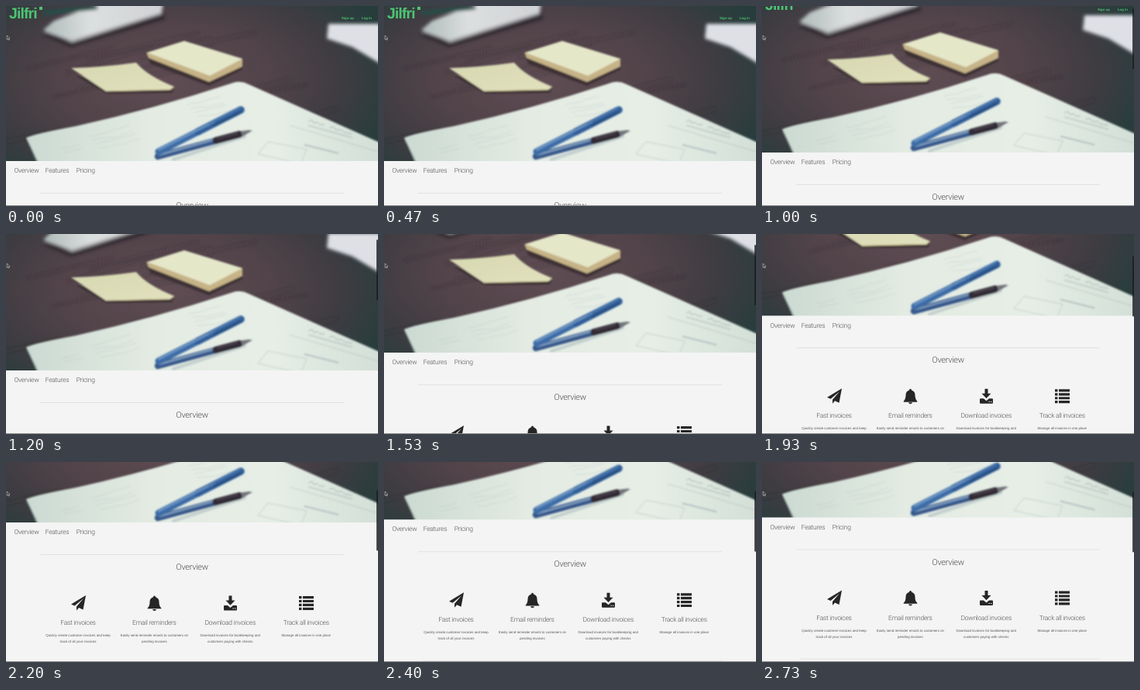
Recreate the animation shown at these times as an HTML page. Size 480x258 px, loop 3070 ms.

```html
<!DOCTYPE html>
<html lang="en">
<head>
<meta charset="utf-8">
<title>Landing page scroll</title>
<style>
  html, body { margin: 0; width: 100%; height: 100%; overflow: hidden; background: #f4f4f4; }
  svg { display: block; width: 480px; height: 258px; }
  text { text-rendering: geometricPrecision; }
  .light { font-family: Roboto, "Liberation Sans", sans-serif; font-weight: 300; letter-spacing: -.03em; fill: #505050; }
  .nav, .col { font-size: 8.5px; }
  .head { font-size: 11px; }
  .mid { text-anchor: middle; }
  .note { font: 4.4px "Liberation Sans", Arial, sans-serif; fill: #555; text-anchor: middle; }
  .green { font-family: "Liberation Sans", Arial, sans-serif; font-weight: bold; fill: #4cc573; }
  .logo { font-size: 19.5px; letter-spacing: -.9px; }
  .link { font-size: 4.3px; }
</style>
</head>
<body>
<svg viewBox="0 0 480 258" xmlns="http://www.w3.org/2000/svg">
  <defs>
    <radialGradient id="desk" gradientUnits="userSpaceOnUse" cx="0" cy="0" r="1" gradientTransform="translate(205 95) scale(310 165)">
      <stop offset="0" stop-color="#604d54"/>
      <stop offset=".45" stop-color="#514349"/>
      <stop offset=".75" stop-color="#3d3c41"/>
      <stop offset="1" stop-color="#263d3c"/>
    </radialGradient>
    <linearGradient id="sheet" x1="0" y1="0" x2="1" y2="0">
      <stop offset="0" stop-color="#cbdad2"/>
      <stop offset=".35" stop-color="#e3ebe3"/>
      <stop offset=".7" stop-color="#e6eee6"/>
      <stop offset="1" stop-color="#d2dfd7"/>
    </linearGradient>
    <linearGradient id="yellow" x1="0" y1="0" x2="1" y2="1">
      <stop offset="0" stop-color="#d6d8b2"/>
      <stop offset="1" stop-color="#e2e1bd"/>
    </linearGradient>
    <linearGradient id="stack" x1="0" y1="0" x2="1" y2="0">
      <stop offset="0" stop-color="#aebbb9"/>
      <stop offset=".4" stop-color="#dcdfdf"/>
      <stop offset="1" stop-color="#d0d2d5"/>
    </linearGradient>
    <filter id="soft" x="-10%" y="-10%" width="120%" height="120%"><feGaussianBlur stdDeviation="2"/></filter>
    <filter id="mild" x="-10%" y="-10%" width="120%" height="120%"><feGaussianBlur stdDeviation="1.3"/></filter>
    <filter id="near" x="-10%" y="-10%" width="120%" height="120%"><feGaussianBlur stdDeviation=".8"/></filter>
  </defs>

  <g id="page">
    <rect width="480" height="201" fill="url(#desk)"/>
    <g id="grain" fill="none" stroke="#2f252b" stroke-opacity=".16" filter="url(#soft)"/>

    <!-- far papers -->
    <g filter="url(#soft)">
      <path d="M46 37L84 53L205 17L202 4Z" fill="#2e282d"/>
      <path d="M48 31L62 19L122 -4H203L200 11L85 47Z" fill="url(#stack)"/>
      <path d="M50 33L85 45L199 10" fill="none" stroke="#8d878c" stroke-width="1.5"/>
      <path d="M48 9L118 2" stroke="#24504a" stroke-width="5"/>
      <path d="M416 23L484 23V75L447 53L414 42Z" fill="#dee0e6"/>
    </g>

    <!-- sticky notes -->
    <g filter="url(#mild)">
      <path d="M90 90L130 113L214 112L217 106Z" fill="#3d3035"/>
      <path d="M84 80Q125 79 168 73Q182 90 217 104L212 108L129 110Q108 96 84 80Z" fill="url(#yellow)"/>
      <path d="M129 110L212 108L217 104" fill="none" stroke="#b5ac82" stroke-width="1.2"/>
      <path d="M182 66L187 75L262 103L305 82V72Z" fill="#3d3034"/>
      <path d="M181 60L184 67L262 98L305 78V68Z" fill="#c6b387"/>
      <path d="M182 60L230 45L305 68L263 90Z" fill="#e5e7c9"/>
    </g>

    <!-- sheet -->
    <g filter="url(#near)">
      <path d="M26 170Q36 165 90 155Q190 133 290 100Q302 95 313 101L484 177V204H41Z" fill="url(#sheet)"/>
      <path d="M27 172L42 203" stroke="#93a29d" stroke-width="1.5"/>
      <g id="sketch" fill="none" stroke="#8d9d9d" stroke-width=".7" stroke-opacity=".28"/>
      <g fill="none" stroke="#9eacab" stroke-width=".7" stroke-opacity=".65">
        <path d="M338 175L388 185L380 204M338 175L325 191L374 202M366 154L480 188"/>
        <path d="M390 149l5 -2l2 4l5 -1l3 3l6 0M417 157l6 -1l3 4l7 0l3 3l11 2M390 154L447 170" stroke="#6d7980"/>
        <path d="M385 179L429 190" stroke="#798b9c" stroke-width="2" stroke-dasharray="1.5 .8"/>
      </g>
    </g>

    <!-- pens -->
    <g stroke-linecap="round" fill="none" filter="url(#near)">
      <path d="M216 198L308 168" stroke="#a3b4b8" stroke-width="4" stroke-opacity=".5"/>
      <path d="M196 194L270 174" stroke="#37598a" stroke-width="8.500"/>
      <path d="M198 192L268 172.500" stroke="#86a5c7" stroke-width="2"/>
      <path d="M197 188L250 161" stroke="#3c6ca6" stroke-width="9"/>
      <path d="M248 162L303 134" stroke="#335f99" stroke-width="9.500"/>
      <path d="M197 185.500L268 149.500" stroke="#6f9ac8" stroke-width="2"/>
      <path d="M262 152L302 131.500" stroke="#4f7fb6" stroke-width="1.800"/>
      <path d="M268 154L303 136.500" stroke="#25466f" stroke-width="1.500"/>
      <path d="M271 173.500L301 165.500" stroke="#302b34" stroke-width="9"/>
      <path d="M273 171L299 164" stroke="#5a505c" stroke-width="1.200"/>
      <path d="M303 161.500L314 160L318 161L314 163L305 168.500Z" fill="#73737a"/>
    </g>

    <text class="green logo" x="4" y="15.500">Jilfri</text>
    <rect x="43" y="1" width="4" height="4" fill="#4cc573"/>
    <text class="green link" x="433" y="16.800">Sign up</text>
    <text class="green link" x="459" y="16.800">Log in</text>

    <rect y="200" width="480" height="260" fill="#f4f4f4"/>
    <text class="light nav" x="10.500" y="215.200">Overview</text>
    <text class="light nav" x="50.700" y="215.200">Features</text>
    <text class="light nav" x="90.700" y="215.200">Pricing</text>
    <path d="M44 241.500H436M50 382.500H436" stroke="#dedede" stroke-width=".8"/>
    <text class="light head mid" x="240" y="261">Overview</text>

    <g fill="#262626">
      <path d="M103 294L99.500 312.500L94 310L91 313.500V308.500L100 298L88.500 307.500L84 305.500Z"/>
      <path d="M191.500 294.500q1.500 0 1.500 1.700q4.500 1.300 4.500 6.300q0 5.500 2.800 7.800v1h-17.600v-1q2.800-2.300 2.800-7.800q0-5 4.500-6.300q0-1.700 1.500-1.700zM189 312h5q-.5 2-2.500 2t-2.500-2z"/>
      <path d="M287.500 294.500h4v6h4l-6 6.200l-6-6.200h4zM282 307h4l3.500 3l3.500-3h4q1 0 1 1v4.500q0 1-1 1h-15q-1 0-1-1v-4.500q0-1 1-1z"/>
      <path d="M292.500 311h1.500M295 311h1.500" stroke="#f4f4f4" stroke-width="1"/>
      <path id="list"/>
    </g>
    <g id="columns"/>
  </g>

  <rect id="thumb" x="478" width="2" height="78" rx="1" fill="#1c1c1e" fill-opacity=".8"/>
  <path d="M1.300 38V43.300L2.500 42.200L3.300 44L4.200 43.600L3.400 41.900H5Z" fill="#222" stroke="#ddd" stroke-width=".6"/>
  <rect y="257" width="480" height="1" fill="#8b8b8b"/>
</svg>
<script>
const $ = id => document.getElementById(id);
const LOOP = 3070, FPS = 15;

const columns = [
  [93, 'Fast invoices', 'Quickly create customer invoices and keep', 'track of all your invoices'],
  [191.4, 'Email reminders', 'Easily send reminder emails to customers on', 'pending invoices'],
  [289.2, 'Download invoices', 'Download invoices for bookkeeping and', 'customers paying with checks'],
  [387.3, 'Track all invoices', 'Manage all invoices in one place', '']
];
$('columns').innerHTML = columns.map(([x, title, a, b]) =>
  `<text class="light col mid" x="${x}" y="332">${title}</text>
   <text class="note" x="${x}" y="347">${a}</text>
   <text class="note" x="${x}" y="355">${b}</text>`).join('');

$('list').setAttribute('d', [0, 1, 2, 3].map(i => {
  const y = 295 + i * 4.9;
  return `M378 ${y}h3.500v3.200h-3.500zM383 ${y}h14v3.200h-14z`;
}).join(''));

let seed = 7;
const rand = () => (seed = seed * 16807 % 2147483647) / 2147483647;

$('grain').innerHTML = Array.from({ length: 16 }, () => {
  const x = rand() * 400 - 40, y = rand() * 200;
  return `<path d="M${x} ${y}l${90 + rand() * 80} ${-22 - rand() * 14}" stroke-width="${2 + rand() * 4}"/>`;
}).join('');

// Faint handwriting rows, following the tilt of the sheet
function scribble(x, y, rows, w) {
  let d = '';
  for (let r = 0; r < rows; r++) {
    d += `M${x + r * 4} ${y + r * 5}`;
    for (let i = 0; i < w; i += 4) d += `l4 ${-1 + (rand() - .5) * 2}`;
  }
  return `<path d="${d}"/>`;
}
$('sketch').innerHTML = scribble(108, 168, 4, 52) + scribble(234, 128, 4, 44) + scribble(70, 184, 2, 24);

// Scroll offset by frame, joined by a monotone cubic
const keys = [[12, 0], [15, 11], [18, 24], [23, 47], [26, 67], [33, 122], [41, 128.5]];
const slope = i => (keys[i + 1][1] - keys[i][1]) / (keys[i + 1][0] - keys[i][0]);
const tangent = i => {
  if (i === 0 || i === keys.length - 1) return 0;
  const a = slope(i - 1), b = slope(i);
  return 2 * a * b / (a + b);
};
function scrollAt(f) {
  if (f <= keys[0][0]) return 0;
  const i = keys.findIndex((k, n) => n < keys.length - 1 && f < keys[n + 1][0]);
  if (i < 0) return keys[keys.length - 1][1];
  const [x0, y0] = keys[i], [x1, y1] = keys[i + 1];
  const h = x1 - x0, u = (f - x0) / h, v = 1 - u;
  return y0 * (1 + 2 * u) * v * v + y1 * u * u * (3 - 2 * u)
    + h * u * v * (tangent(i) * v - tangent(i + 1) * u);
}

function draw(ms) {
  const frame = Math.floor(ms * FPS / 1000 + .1);
  const s = scrollAt(frame);
  $('page').setAttribute('transform', `translate(0 ${-s.toFixed(2)})`);
  $('thumb').setAttribute('y', (s * .3).toFixed(2));
  $('thumb').setAttribute('visibility', s > 0 ? 'visible' : 'hidden');
}

const start = performance.now();
function tick() {
  draw((performance.now() - start) % LOOP);
  requestAnimationFrame(tick);
}
draw(0);
requestAnimationFrame(tick);
</script>
</body>
</html>
```
